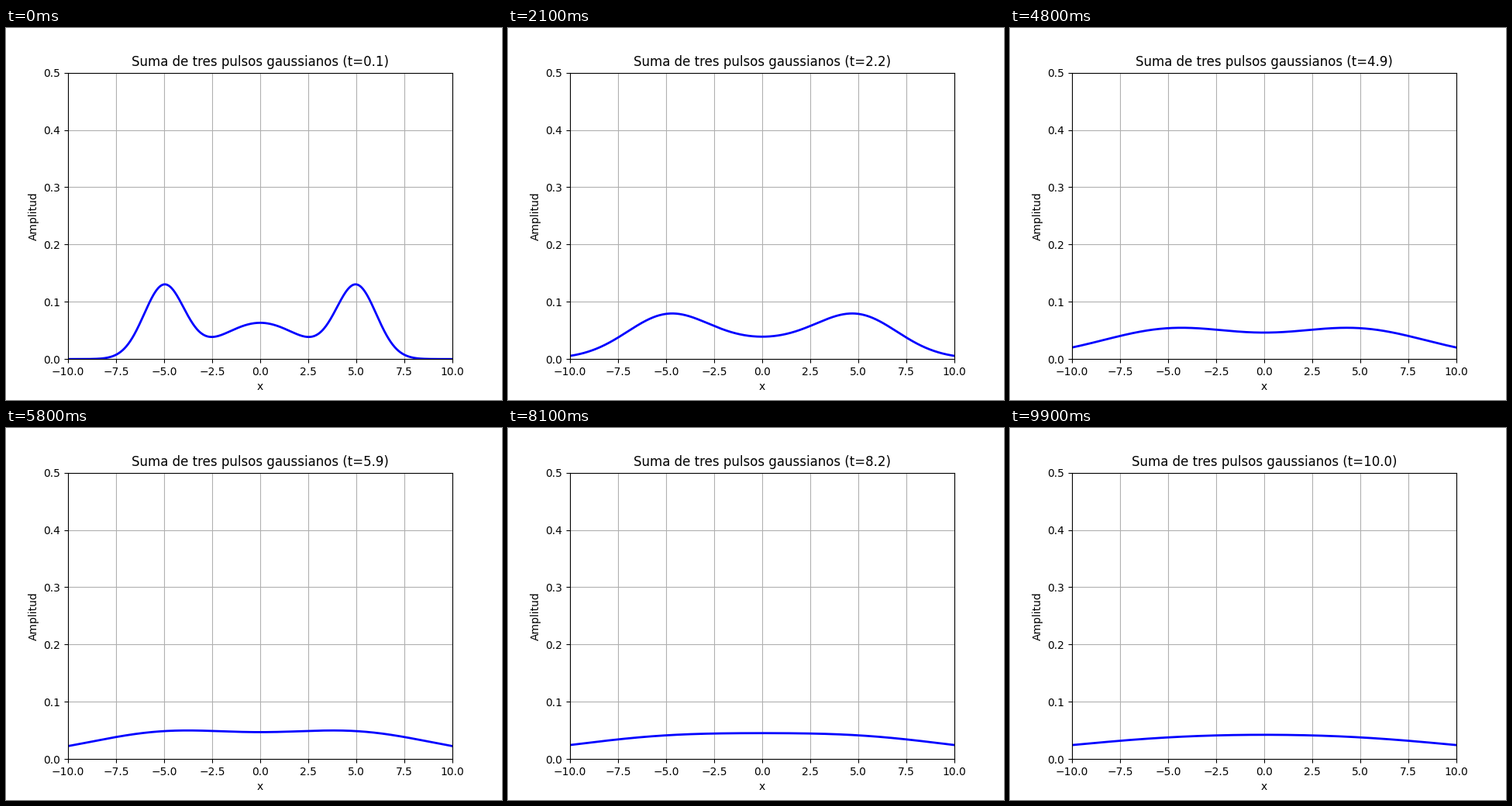
A matplotlib script for the animation above (10000 ms loop, 640 by 480 pixels).

```python
import numpy as np
import matplotlib.pyplot as plt
from matplotlib.animation import FuncAnimation

plt.rcParams["font.family"] = "DejaVu Sans"

FRAMES = 100
PULSES = [(-5, 1), (0, 2), (5, 1)]  # centre, initial width
SPREAD = 0.5

x = np.linspace(-10, 10, 1000)


def gaussian(x, mu, sigma):
    return np.exp(-((x - mu) ** 2) / (2 * sigma**2)) / (sigma * np.sqrt(2 * np.pi))


def amplitude(t):
    growth = 1 + SPREAD * t
    return sum(gaussian(x, mu, s * growth) for mu, s in PULSES) / len(PULSES)


fig, ax = plt.subplots(figsize=(6.4, 4.8), dpi=100)
ax.set_xlim(-10, 10)
ax.set_ylim(0, 0.5)
ax.set_xlabel("x")
ax.set_ylabel("Amplitud")
ax.grid(True)
line, = ax.plot([], [], color="blue", lw=2)
title = ax.set_title("")


def update(i):
    t = (i + 1) / 10
    line.set_data(x, amplitude(t))
    title.set_text(f"Suma de tres pulsos gaussianos (t={t:.1f})")
    return line, title


anim = FuncAnimation(fig, update, frames=FRAMES, interval=100,
                     repeat=True, repeat_delay=0, blit=False)
plt.show()
```
